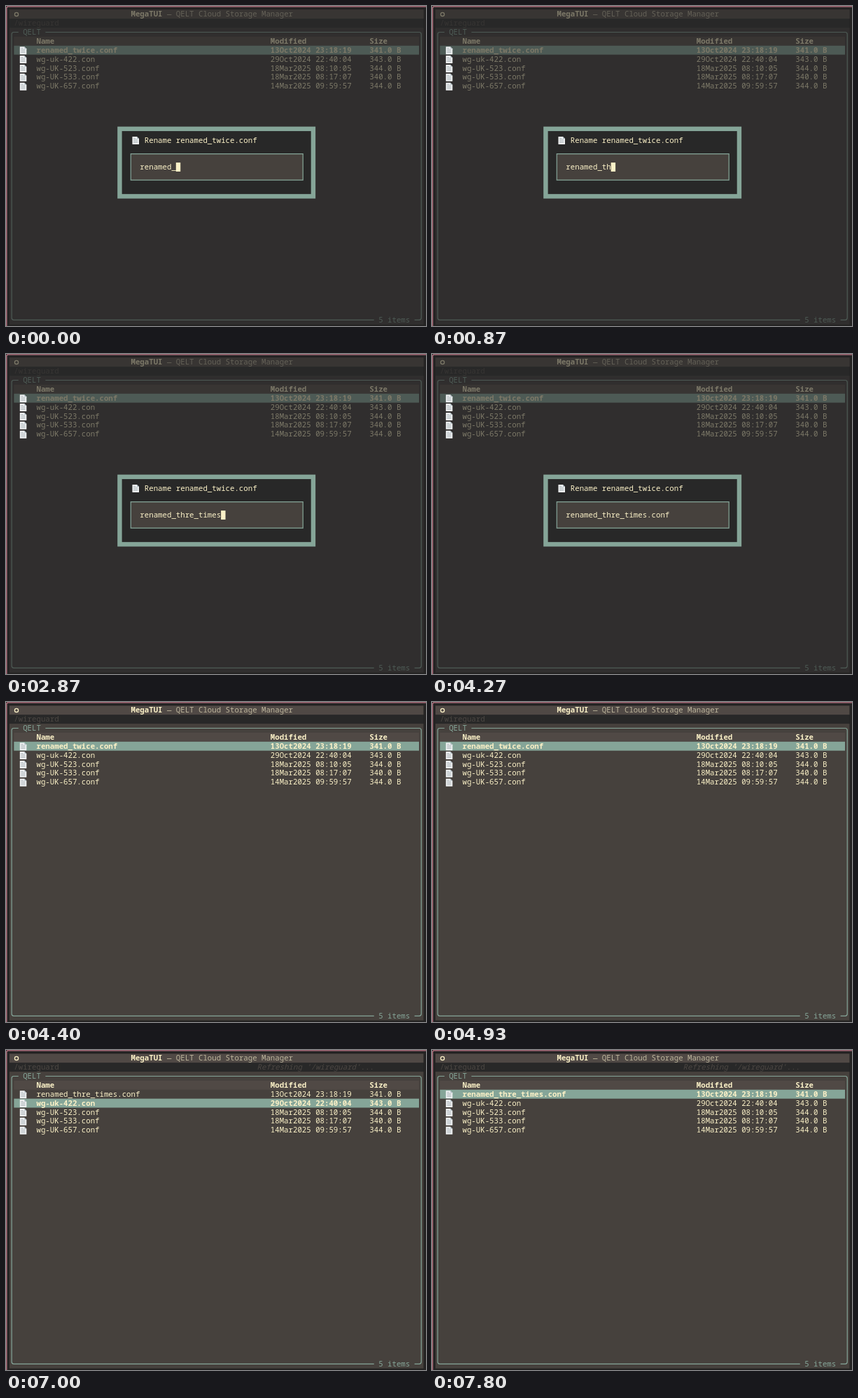
These frames come from a looping animation (600 px wide and 458 px high, 8 s). An HTML page:

```html
<!DOCTYPE html>
<html lang="en">
<head>
<meta charset="utf-8">
<title>Terminal file manager</title>
<style>
  html, body { margin: 0; width: 100%; height: 100%; overflow: hidden; background: #242323; }
  svg { display: block; width: 600px; height: 458px; }
  text {
    font: 500 10.72px "Noto Sans Mono", "DejaVu Sans Mono", monospace;
    fill: #fbf1c7;
    white-space: pre;
  }
  .bold { font-weight: 700; }
  .muted { fill: #bdb59c; }
  .faint { fill: #4c4743; }
  .italic { font-style: italic; }
  .accent { fill: #85a598; }
</style>
</head>
<body>
<svg id="stage" viewBox="0 0 600 458" xmlns="http://www.w3.org/2000/svg"></svg>
<script>
const LOOP = 8000;
const CW = 6.43, CH = 12.87;
const ACCENT = "#85a598", BASE = "#282828", PANEL = "#504945";
const SURFACE = "#3c3836", FOCUSED = "#46413d";
const stage = document.getElementById("stage");

// Terminal cell to pixel
const X = col => 4.9 + col * CW;
const Y = row => 5.3 + row * CH;

function add(tag, attrs, parent = stage) {
  const node = document.createElementNS(stage.namespaceURI, tag);
  for (const key in attrs) node.setAttribute(key, attrs[key]);
  return parent.appendChild(node);
}
const rect = (x, y, width, height, fill, parent) => add("rect", { x, y, width, height, fill }, parent);
const cells = (col, row, w, h, fill, parent) => rect(X(col), Y(row), w * CW, h * CH, fill, parent);
const line = (d, parent) => add("path", { d, fill: "none", stroke: ACCENT, "stroke-width": 1.2 }, parent);
function label(col, row, str, cls = "", parent) {
  const node = add("text", { x: X(col), y: Y(row) + 10.1, class: cls }, parent);
  node.textContent = str;
  return node;
}
function pageIcon(x, y, parent) {
  const g = add("g", { transform: `translate(${x} ${y})` }, parent);
  add("path", { d: "M.5 0H7L10 3V11H.5Z", fill: "#f1f3f4" }, g);
  add("path", { d: "M7 0V3H10Z", fill: "#a9b6bd" }, g);
  add("path", { d: "M2 2.5H5.5M2 4.5H8.3M2 6.5H8.3M2 8.5H8.3", stroke: "#8f9a9f", "stroke-width": .7 }, g);
}

// Window frame
rect(0, 0, 600, 458, "#242323");
add("path", { d: "M.8 458V3Q.8 .8 3 .8H600", fill: "none", stroke: "#c27b8b", "stroke-width": 1.3 });
cells(0, 1, 92, 1, BASE);
const surface = cells(0, 2, 92, 33, SURFACE);

// Title bar and path
cells(0, 0, 92, 1, PANEL);
add("circle", { cx: 15, cy: 11.9, r: 2.6, fill: "none", stroke: "#fbf1c7", "stroke-width": 1.3 });
label(27, 0, "MegaTUI", "bold");
label(35, 0, "— QELT Cloud Storage Manager", "muted");
label(1, 1, "/wireguard", "faint");
const status = label(55, 1, "Refreshing '/wireguard'...", "faint italic");

// Rounded border with gaps for its captions
const L = X(.5), R = X(91.5), T = Y(2.5), B = Y(34.5);
line(`M${X(2)} ${T}H${L + 3}Q${L} ${T} ${L} ${T + 3}V${B - 3}Q${L} ${B} ${L + 3} ${B}H${X(81)}`);
line(`M${X(8)} ${T}H${R - 3}Q${R} ${T} ${R} ${T + 3}V${B - 3}Q${R} ${B} ${R - 3} ${B}H${X(90)}`);
label(3, 2, "QELT", "accent");
label(82, 34, "5 items", "accent");

// File table
const files = [
  ["renamed_twice.conf", "13Oct2024 23:18:19", "341.0 B"],
  ["wg-uk-422.con", "29Oct2024 22:40:04", "343.0 B"],
  ["wg-UK-523.conf", "18Mar2025 08:10:05", "344.0 B"],
  ["wg-UK-533.conf", "18Mar2025 08:17:07", "340.0 B"],
  ["wg-UK-657.conf", "14Mar2025 09:59:57", "344.0 B"]
];
const COLS = [6, 58, 80];
cells(1, 3, 90, 1, PANEL);
const bar = cells(1, 4, 90, 1, ACCENT);
["Name", "Modified", "Size"].forEach((s, i) => label(COLS[i], 3, s, "bold"));
const rows = files.map((file, r) => file.map((s, i) => label(COLS[i], 4 + r, s)));

// Rename dialog
const shade = add("g", {});
cells(0, 0, 92, 35, BASE, shade).setAttribute("opacity", .6);
files.forEach((f, r) => pageIcon(19.3, Y(4 + r) + 1.4));
const dialog = add("g", {});
cells(24, 13, 44, 8, ACCENT, dialog);
rect(X(25), Y(13.5), 42 * CW, 7 * CH, BASE, dialog);
pageIcon(180, Y(14) + 1.4, dialog);
label(30, 14, "Rename renamed_twice.conf", "", dialog);
rect(178.3, 211.6, 245.9, 37.6, FOCUSED, dialog);
line("M178.3 211.6H424.2V249.2H178.3Z", dialog);
const input = label(29, 17, "", "", dialog);
const caret = cells(0, 17, 1, 1, "#fbf1c7", dialog);

// [time, value] steps
const typing = [
  [0, ""], [600, "t"], [730, "th"], [930, "thr"], [1070, "thre"], [1230, "three"],
  [1800, "thre"], [1930, "thre-"], [2070, "thre"], [2130, "thre_"],
  [2400, "thre_t"], [2470, "thre_ti"], [2670, "thre_tim"], [2730, "thre_time"],
  [2870, "thre_times"], [3270, "thre_times."], [3470, "thre_times.c"],
  [3530, "thre_times.co"], [3670, "thre_times.con"], [3730, "thre_times.conf"]
];
const caretSteps = [[0, 1], [1730, 0], [1800, 1], [4270, 0]];
const cursorSteps = [
  [0, 0], [6400, 1], [6500, 2], [6600, 3], [6700, 4], [6800, 3], [6900, 2], [7000, 1], [7070, 0],
  [7200, 1], [7270, 2], [7330, 3], [7470, 4], [7530, 3], [7600, 2], [7730, 1], [7800, 0]
];
const CLOSE = 4400, REFRESH = 5130, RENAMED = 5400;

const at = (steps, t) => steps.findLast(s => s[0] <= t)[1];
const show = (node, on) => node.setAttribute("visibility", on ? "visible" : "hidden");
function write(node, str) {
  if (node.textContent !== str) node.textContent = str;
}

function draw(t) {
  const open = t < CLOSE, value = "renamed_" + at(typing, t);
  [shade, dialog].forEach(g => g.setAttribute("display", open ? "inline" : "none"));
  surface.setAttribute("fill", open ? SURFACE : FOCUSED);
  write(input, value);
  caret.setAttribute("x", X(29 + value.length));
  show(caret, open && at(caretSteps, t));
  show(status, t >= REFRESH);

  const cursor = at(cursorSteps, t);
  bar.setAttribute("y", Y(4 + cursor));
  rows.forEach((row, r) => row.forEach(n => n.setAttribute("class", r === cursor ? "bold" : "")));
  write(rows[0][0], t < RENAMED ? "renamed_twice.conf" : "renamed_thre_times.conf");
}

const start = performance.now();
function tick() {
  draw((performance.now() - start) % LOOP);
  requestAnimationFrame(tick);
}
tick();
</script>
</body>
</html>
```
